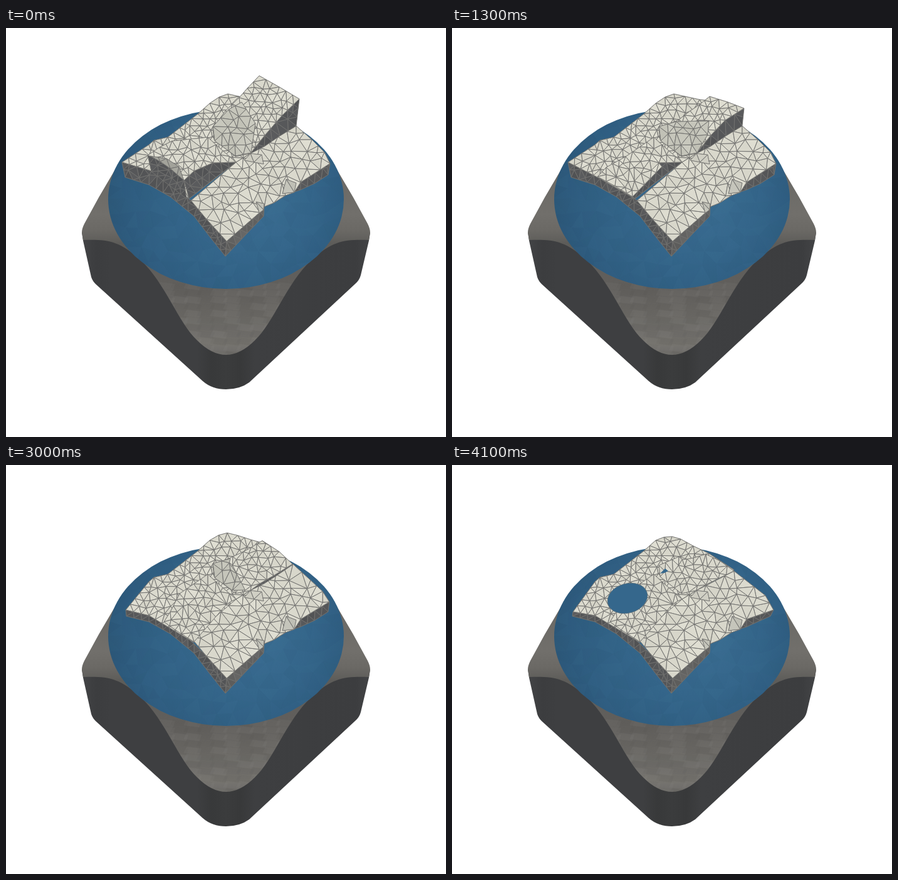
These frames come from a looping animation (702x652 px, 4.2 s). An HTML page with a canvas:

```html
<!DOCTYPE html>
<html lang="en">
<head>
<meta charset="utf-8">
<title>Milling a mesh on a dome</title>
<style>
html, body { margin: 0; width: 100%; height: 100%; overflow: hidden; background: #fff; }
canvas { display: block; }
</style>
</head>
<body>
<canvas id="stage" width="702" height="652"></canvas>
<script>
const W = 702, H = 652, LOOP = 4200;
const ctx = document.getElementById('stage').getContext('2d');
const LIGHT = [218, 217, 205], DARK = [86, 87, 89], LINE = '#71716f';

// Time in ms, then cutting stage reached; the picture holds in between.
const STEPS = [
  [0, 0], [300, .35], [400, .7], [500, 1], [600, 1.1], [800, 1.2], [900, 1.3],
  [1200, 1.7], [1300, 2], [1500, 2.35], [1600, 2.7], [1800, 3], [2200, 3.3],
  [2400, 3.65], [2600, 4], [2700, 4.1], [2800, 4.2], [3000, 4.35], [3100, 4.5],
  [3200, 4.7], [3300, 4.85], [3400, 5], [3600, 5.17], [3700, 5.33], [3800, 5.5],
  [3900, 5.67], [4000, 5.83], [4100, 6]
];

// Vertices: "x,y" at the start, then "|stage:x,y" for each place reached by that stage.
const LEFT = '185,214|3:191,231|6:193,234';
const RIGHT = '517,216|5:514,222|6:513,231';
const RIDGE = '468,113|1:467,125|2:466,128|4:461,152|5:450,169';
const RIDGE_A = '440,140|1:436,147|4:428,174|5:425,181';
const RIDGE_B = '413,171|4:405,188|5:405,191';
const STEP_A = '226,203|1:228,216|2:232,237|3:252,250';
const STEP_B = '258,214|1:258,232|2:260,252|3:270,263';
const LIP_A = '300,228|1:312,229|2:335,221|3:352,222';
const LIP_B = '330,215|3:360,217';

const FACES = [
  { // front left wall
    rgb: DARK, size: 12,
    path: `${LEFT} 232,228|2:236,240|3:228,240 288,270|3:270,259 297,276|3:300,285 320,305 352,340 350,364 326,334 300,300 262,269 228,250 190,238|3:192,241`
  },
  { rgb: [98, 98, 97], size: 14, path: '352,340 405,293 412,285 411,300 385,327 350,364' },
  { rgb: DARK, size: 13, path: `${RIGHT} 470,246 455,263 470,258 492,248 514,234|6:508,241` },
  { // back and left
    rgb: LIGHT, size: 12.5,
    path: `${LEFT} 228,186 236,179 258,174 306,137 325,120 340,110|5:338,115 354,105|5:351,114 372,109|5:365,118 395,114|5:385,129 412,116|5:410,141 440,150|5:450,167 390,200 367,214 292,272|3:300,283 232,228|2:236,240|3:228,240`
  },
  { // front slab
    rgb: LIGHT, size: 17,
    path: `295,275 367,214 390,200 463,156|4:462,152|5:450,169 488,178|5:482,194 508,198|5:500,208 ${RIGHT} 470,246 460,262 446,267 427,279 412,285 405,294 352,340 320,305`
  },
  { rgb: [196, 196, 186], size: 20, path: '447,241 463,247 460,262 441,264' },
  { rgb: [198, 198, 188], size: 20, path: '399,277 412,280 411,290 404,295' },
  { rgb: [204, 203, 192], size: 20, path: '390,200 408,202 411,217 380,211' },
  { // left ridge, end wall
    rgb: DARK, size: 12, until: 2,
    path: `${STEP_A} ${STEP_B} 284,243|1:286,255|2:288,269 288,272 232,229|2:232,238`
  },
  { // left ridge, long wall
    rgb: DARK, size: 14, until: 4,
    path: `284,243|1:286,255|2:288,269|3:338,237|4:366,214 ${LIP_A}|4:366,214 ${LIP_B}|4:366,214 367,214 335,238|3:352,228|4:367,215 292,272|3:340,237|4:367,215`
  },
  { // left ridge, top
    rgb: LIGHT, size: 13,
    path: `${STEP_A} 245,190|2:246,222|3:262,234 265,180|2:277,205 322,174 335,186 367,214 ${LIP_B} ${LIP_A} 284,243|1:286,255|2:288,269|3:300,282 ${STEP_B}`
  },
  { rgb: [166, 166, 158], size: 17, until: .7, path: '230,204 256,208 276,221 284,243 262,224 246,213' },
  { // right ridge, long wall
    rgb: DARK, size: 15, until: 5,
    path: `${RIDGE} 463,156|4:460,154|5:450,170 437,172|4:434,173|5:428,182 412,189 390,200 ${RIDGE_B} ${RIDGE_A}`
  },
  { // right ridge, top
    rgb: LIGHT, size: 13,
    path: `404,76|1:408,87|2:411,109|5:405,142 436,94|1:437,105|2:440,118|4:440,130|5:428,153 ${RIDGE} ${RIDGE_A} ${RIDGE_B} 390,200 366,205 332,178 330,160 350,132|2:362,146 372,111|2:380,132|5:375,150 385,96|1:383,98|2:395,122|5:385,148`
  },
  { // right ridge, sloping end
    rgb: [198, 198, 187], size: 16, until: 5,
    path: '330,157 355,130|2:358,149 376,118|2:410,148|4:365,152|5:340,164 398,152|2:408,170|4:378,172|5:350,176 391,199|5:364,200 366,204|5:352,192 333,180'
  }
];

const clamp = v => Math.max(0, Math.min(1, v));
const hash = (x, y) => {
  const v = Math.sin(x * 127.1 + y * 311.7) * 43758.5453;
  return v - Math.floor(v);
};
const pair = text => text.split(',').map(Number);

function vertex(text, stage) {
  const [start, ...keys] = text.split('|');
  return keys.reduce((p, key) => {
    const [k, pos] = key.split(':');
    const f = clamp(stage - k + 1);
    return pair(pos).map((v, i) => p[i] + (v - p[i]) * f);
  }, pair(start));
}

function inside(poly, x, y) {
  let hit = false;
  poly.forEach(([ax, ay], i) => {
    const [bx, by] = poly[(i + 1) % poly.length];
    if (ay > y !== by > y && x < ax + (bx - ax) * (y - ay) / (by - ay)) hit = !hit;
  });
  return hit;
}

// Points along the outline and on a jittered grid within it.
function scatter(poly, size) {
  const pts = [];
  const add = (x, y, gap) => {
    if (pts.every(p => Math.hypot(p[0] - x, p[1] - y) > gap)) pts.push([x, y]);
  };
  poly.forEach(([ax, ay], i) => {
    const [bx, by] = poly[(i + 1) % poly.length];
    const n = Math.max(1, Math.round(Math.hypot(bx - ax, by - ay) / size));
    for (let k = 0; k < n; k++) {
      const x = ax + (bx - ax) * k / n, y = ay + (by - ay) * k / n;
      add(x + hash(x, y) * .02, y + hash(y, x) * .02, 1);
    }
  });
  const row = size * .82;
  const ys = poly.map(p => p[1]), xs = poly.map(p => p[0]);
  for (let j = Math.floor(Math.min(...ys) / row); j * row < Math.max(...ys); j++) {
    for (let i = Math.floor(Math.min(...xs) / size) - 1; i * size < Math.max(...xs); i++) {
      const x = (i + j % 2 / 2 + .6 * (hash(i, j) - .5)) * size;
      const y = (j + .6 * (hash(j + 9, i) - .5)) * row;
      if (inside(poly, x, y)) add(x, y, size * .55);
    }
  }
  return pts;
}

function circle(a, b, c) {
  const bx = b[0] - a[0], by = b[1] - a[1], cx = c[0] - a[0], cy = c[1] - a[1];
  const d = 2 * (bx * cy - by * cx) || 1e-9;
  const b2 = bx * bx + by * by, c2 = cx * cx + cy * cy;
  const x = (cy * b2 - by * c2) / d, y = (bx * c2 - cx * b2) / d;
  return { t: [a, b, c], x: a[0] + x, y: a[1] + y, r: x * x + y * y };
}

// Delaunay triangles, one point at a time.
function triangulate(pts) {
  const far = [[-9000, -8000], [9500, -8100], [300, 9900]];
  let tris = [circle(...far)];
  for (const p of pts) {
    const edges = [];
    tris = tris.filter(c => {
      if ((p[0] - c.x) ** 2 + (p[1] - c.y) ** 2 >= c.r) return true;
      c.t.forEach((a, i) => {
        const b = c.t[(i + 1) % 3];
        const twin = edges.findIndex(e => e[0] === b && e[1] === a);
        if (twin < 0) edges.push([a, b]);
        else edges.splice(twin, 1);
      });
      return false;
    });
    for (const [a, b] of edges) tris.push(circle(a, b, p));
  }
  return tris.map(c => c.t).filter(t => !t.some(p => far.includes(p)));
}

function trace(g, poly) {
  g.beginPath();
  poly.forEach(p => g.lineTo(...p));
  g.closePath();
}

function drawFace({ rgb, size, path, until = 9 }, stage) {
  if (stage >= until) return;
  const poly = path.split(' ').map(v => vertex(v, stage));
  ctx.save();
  trace(ctx, poly);
  ctx.fillStyle = `rgb(${rgb})`;
  ctx.fill();
  ctx.clip();
  ctx.strokeStyle = LINE;
  ctx.lineWidth = 1;
  for (const t of triangulate(scatter(poly, size))) {
    const x = (t[0][0] + t[1][0] + t[2][0]) / 3, y = (t[0][1] + t[1][1] + t[2][1]) / 3;
    if (!inside(poly, x, y)) continue;
    const shade = (hash(x, y) - .5) * 11;
    trace(ctx, t);
    ctx.fillStyle = `rgb(${rgb.map(v => Math.round(v + shade))})`;
    ctx.fill();
    ctx.stroke();
  }
  ctx.restore();
  trace(ctx, poly);
  ctx.strokeStyle = LINE;
  ctx.lineWidth = .8;
  ctx.stroke();
}

function ramp(g, box, stops) {
  const fill = box.length > 4 ? g.createRadialGradient(...box) : g.createLinearGradient(...box);
  stops.forEach(([at, color]) => fill.addColorStop(at, color));
  return fill;
}

function drawBase() {
  const layer = document.createElement('canvas');
  layer.width = W;
  layer.height = H;
  const g = layer.getContext('2d');
  g.fillStyle = '#fff';
  g.fillRect(0, 0, W, H);

  g.fillStyle = ramp(g, [121, 0, 581, 0], [
    [0, '#434446'], [.05, '#3c3d3f'], [.1, '#3e3f41'], [.4, '#3e3f41'], [.45, '#38393a'],
    [.5, '#3b3c3d'], [.55, '#38393a'], [.6, '#3e3f41'], [.95, '#3c3d3f'], [1, '#434446']
  ]);
  g.fill(new Path2D('M121 326L123 339L136 397Q138 404 145 410L314 563Q329 576 351 576Q373 576 388 565L557 408Q564 402 566 394L579 339L581 326Z'));

  const rim = new Path2D('M185 207L148 270L125 312Q121 320 121 326L123 338C160 337 180 338 215 370C255 408 275 470 305 498Q328 521 351 521Q374 521 397 498C427 470 447 408 487 370C522 338 542 337 579 338L581 326Q581 320 577 312L554 270L517 207Z');
  g.save();
  g.clip(rim);
  g.fillStyle = ramp(g, [0, 210, 0, 521], [
    [0, '#686763'], [.28, '#716f6b'], [.36, '#6b6965'], [.43, '#5d5c59'],
    [.66, '#615f5c'], [.83, '#6b6965'], [.94, '#73716c'], [1, '#6b6965']
  ]);
  g.fillRect(0, 0, W, H);
  // faint facets along the rim
  for (let y = 405; y < 521; y += 11) {
    for (let x = 225; x < 480; x += 21) {
      g.fillStyle = `rgba(${hash(x, y) > .5 ? '255,255,255' : '0,0,0'},.022)`;
      trace(g, [[x, y], [x + 24, y + 3], [x + 21, y + 13], [x - 5, y + 10]]);
      g.fill();
    }
  }
  g.restore();

  g.save();
  g.beginPath();
  g.ellipse(351, 273, 188, 143, 0, 0, 7);
  g.clip();
  g.fillStyle = ramp(g, [400, 270, 20, 365, 265, 205], [
    [0, '#3a6d92'], [.45, '#35678c'], [.8, '#305f83'], [1, '#2d597a']
  ]);
  g.fillRect(0, 0, W, H);
  const area = [[160, 125], [542, 125], [542, 420], [160, 420]];
  for (const t of triangulate(scatter(area, 24))) {
    g.fillStyle = `rgba(10,30,50,${hash(t[0][0], t[1][1]) * .045})`;
    trace(g, t);
    g.fill();
  }
  g.restore();
  return layer;
}

function drawHole(x, y, rx, ry, turn) {
  ctx.beginPath();
  ctx.ellipse(x, y, rx, ry, turn, 0, 7);
  ctx.fillStyle = '#35678c';
  ctx.fill();
  ctx.strokeStyle = '#5b6a73';
  ctx.lineWidth = .7;
  ctx.stroke();
}

function drawScene(stage) {
  ctx.drawImage(base, 0, 0);
  FACES.forEach(face => drawFace(face, stage));
  const open = Math.sqrt(clamp((stage - 5.3) / .7));
  if (open > 0) drawHole(280, 212.5, 32.5 * open, 23.5 * open, -.28);
  if (stage > 5.8) {
    trace(ctx, [[332, 173], [340, 165], [345, 169], [339, 172]]);
    ctx.fillStyle = '#35678c';
    ctx.fill();
  }
}

const base = drawBase();
let shown = -1;
function frame() {
  const t = performance.now() % LOOP;
  const step = STEPS.filter(([at]) => at <= t).length - 1;
  if (step !== shown) drawScene(STEPS[shown = step][1]);
  requestAnimationFrame(frame);
}
frame();
</script>
</body>
</html>
```
